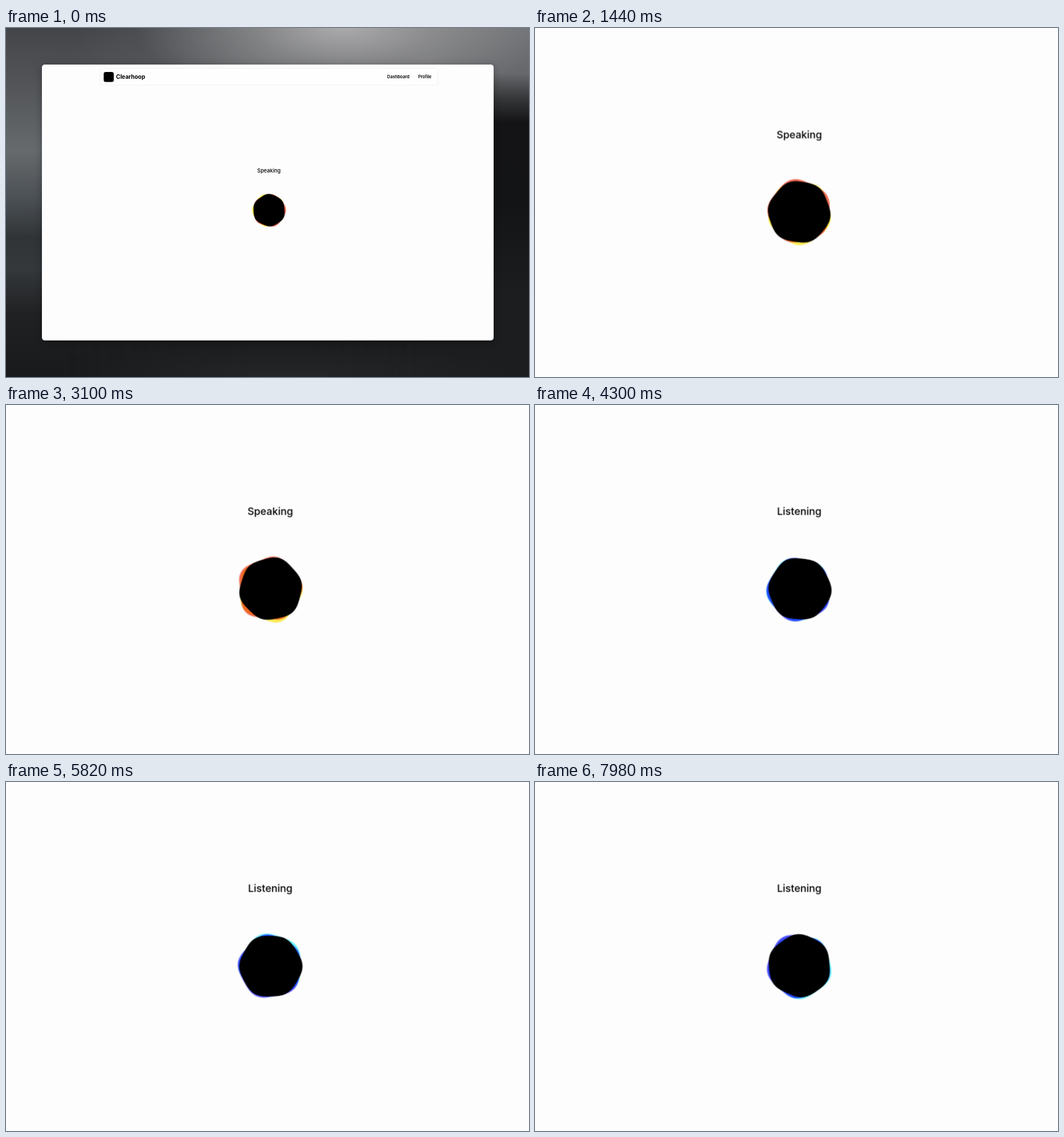
An HTML page that plays this animation: 917x611 px, repeating every 8000 ms.

```html
<!DOCTYPE html>
<html lang="en">
<head>
<meta charset="utf-8">
<title>Voice session</title>
<style>
  html, body { margin: 0; width: 100%; height: 100%; overflow: hidden; background: #fdfdfd; }
  #view { position: fixed; inset: 0; overflow: clip; contain: strict; }
  #stage {
    position: absolute; left: 0; top: 0; width: 917px; height: 611px; overflow: clip;
    transform-origin: 458.5px 316.3px;
    animation: zoom 8s infinite;
  }
  @keyframes zoom {
    0%, .9% { transform: scale(1); animation-timing-function: cubic-bezier(.65, 0, .35, 1); }
    20%, 100% { transform: scale(1.95); }
  }
  .wall, .wall::before, .wall::after { position: absolute; inset: 0; content: ""; }
  .wall { background: linear-gradient(#434548, #515356 15%, #666a6d 35%, #4b5054 49%, #303437 60%, #34383b 69%, #202123 82%, #18191a); }
  .wall::before {
    background: linear-gradient(#707174, #67686b 13%, #37383a 20%, #141416 27%, #131416 50%, #1c1d1f 76%, #1c1d1f);
    -webkit-mask-image: linear-gradient(90deg, transparent 12%, #000 80%);
    mask-image: linear-gradient(90deg, transparent 12%, #000 80%);
  }
  .wall::after {
    background:
      radial-gradient(360px 150px at 590px -5px, rgba(180, 180, 181, .9), rgba(160, 160, 162, .55) 45%, transparent),
      radial-gradient(420px 60px at 480px 611px, rgba(44, 45, 47, .6), transparent);
  }
  .window {
    position: absolute; left: 62.5px; top: 64px; width: 792px; height: 483px;
    border-radius: 5px; background: #fdfdfd; box-shadow: 0 3px 14px rgba(0, 0, 0, .3);
  }
  svg { position: absolute; left: 0; top: 0; }
  text { font-family: Inter, "Liberation Sans", sans-serif; fill: #000; }
  .nav { font-size: 7.4px; font-weight: 600; }
  .brand { font-size: 10px; font-weight: 700; }
  .state { font-size: 9.2px; font-weight: 500; text-anchor: middle; }
  #warm, #cool { mix-blend-mode: multiply; }
  .speak { animation: speak 8s step-end infinite; }
  .listen { animation: listen 8s step-end infinite; }
  #warm { animation: warm 8s step-end infinite; }
  #cool { animation: cool 8s step-end infinite; }
  @keyframes speak { 0% { opacity: 1; } 46.75%, 100% { opacity: 0; } }
  @keyframes listen { 0% { opacity: 0; } 46.75%, 100% { opacity: 1; } }
  @keyframes warm { 0% { fill: #f2705a; } 46.75%, 100% { fill: #4f4cff; } }
  @keyframes cool { 0% { fill: #ffee55; } 46.75%, 100% { fill: #66f6ff; } }
</style>
</head>
<body>
<div id="view">
  <div id="stage">
    <div class="wall"></div>
    <div class="window"></div>
    <svg width="917" height="611" viewBox="0 0 917 611">
      <rect x="164.5" y="70.5" width="593" height="29.5" rx="5" fill="#fefefe" stroke="#ececec" stroke-width=".8"/>
      <rect x="171.3" y="77" width="17.6" height="17.6" rx="3.5"/>
      <text class="brand" x="193" y="89.2">Clearhoop</text>
      <text class="nav" x="668.3" y="88.2">Dashboard</text>
      <text class="nav" x="722.7" y="88.2">Profile</text>
      <text class="state speak" x="461" y="252.7">Speaking</text>
      <text class="state listen" x="461" y="252.7">Listening</text>
      <g transform="translate(461.2 319.3)">
        <path id="warm"/>
        <path id="cool"/>
        <path id="core"/>
      </g>
    </svg>
  </div>
</div>
<script>
const LOOP = 8000, POINTS = 96, RAD = Math.PI / 180;
const times = [0, 820, 2200, 4300, 5820, 6800, 7980];

// peak: angle of one lobe, lean: direction the blob drifts to (degrees, clockwise)
const blobs = [
  { id: 'warm', lobes: 5, r: 27.9, wave: 1.2, drift: 0.8, spin: 1, seed: 0,
    peak: [68, 44, 54, 33, 43, 41, 24], lean: [30, 270, 230, 135, 120, 205, 200] },
  { id: 'cool', lobes: 5, r: 27.8, wave: 1.2, drift: 0.8, spin: -1, seed: 2,
    peak: [34, 8, 16, 28, 36, 32, 20], lean: [205, 80, 60, 172, 290, 320, 45] },
  { id: 'core', lobes: 6, r: 27.8, wave: 0.6, drift: 0.25, spin: -1, seed: 4,
    peak: [26, 5, 2, 5, 0, 35, 25], lean: [300, 30, 330, 345, 60, 0, 270] }
];
for (const b of blobs) b.path = document.getElementById(b.id);

const bump = (t, at, width) => Math.exp(-(((t - at) / width) ** 2));

function blobPath(b, t) {
  let i = 0;
  while (i < times.length - 2 && t > times[i + 1]) i++;
  const span = times[i + 1] - times[i];
  const f = Math.min(1, (t - times[i]) / span);
  const mix = list => list[i] + (list[i + 1] - list[i]) * f;
  const turns = Math.round(span / 700) * b.spin;
  const peak = (mix(b.peak) + turns * f * 360 / b.lobes) * RAD;
  const lean = mix(b.lean) * RAD;
  const loud = bump(t, 2880, 190) + bump(t, 3930, 130);
  const gain = 1 + loud * (b.id === 'core' ? 0.5 : 1.6);
  let d = '';
  for (let n = 0; n < POINTS; n++) {
    const a = n / POINTS * 2 * Math.PI;
    const r = b.r + gain * (
      b.wave * Math.cos(b.lobes * (a - peak)) +
      b.drift * Math.cos(a - lean) +
      0.25 * Math.cos(3 * a + t * 0.004 * b.spin + b.seed));
    d += (n ? 'L' : 'M') + (r * Math.cos(a)).toFixed(2) + ' ' + (r * Math.sin(a)).toFixed(2);
  }
  return d + 'Z';
}

let start;
function draw(now) {
  start ??= now;
  let t = (now - start) % LOOP;
  if (t > 3540 && t < 3740) t = 3540; // pause before the state switches
  for (const b of blobs) b.path.setAttribute('d', blobPath(b, t));
  requestAnimationFrame(draw);
}
requestAnimationFrame(draw);
</script>
</body>
</html>
```
